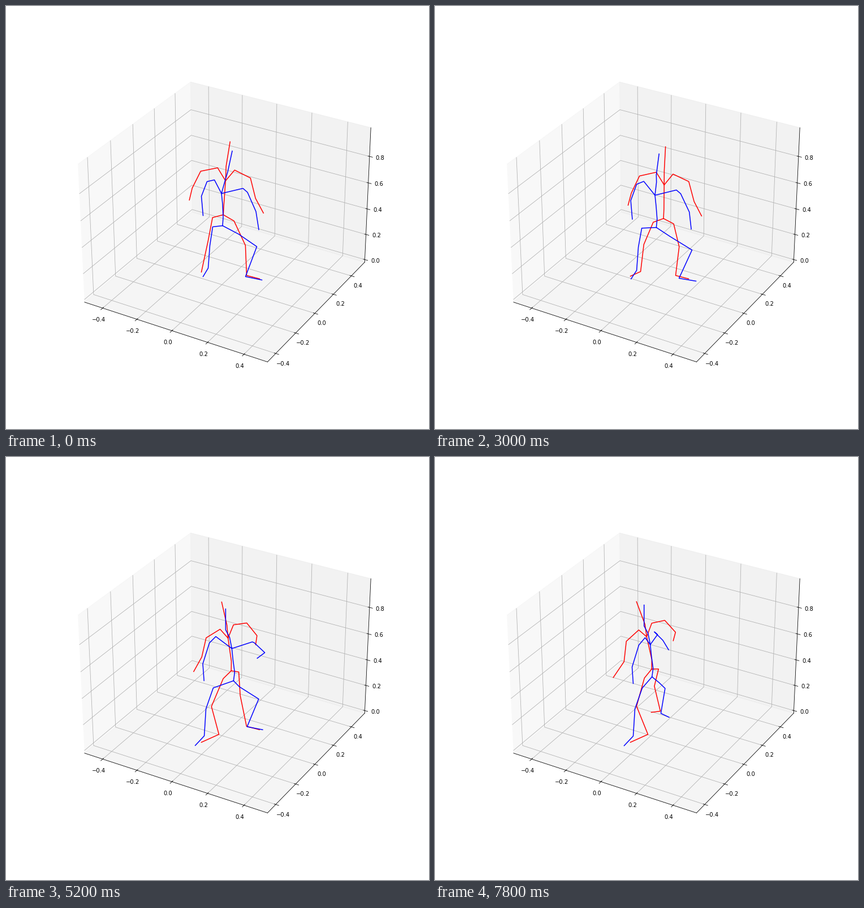
Animation, 748 px wide and 748 px high, one loop 8 s. Source, as a matplotlib script:

```python
import numpy as np
import matplotlib.pyplot as plt
from matplotlib.animation import FuncAnimation

SIZE, DPI = 748, 72
FRAMES, STEP = 40, 200

fig = plt.figure(figsize=((SIZE + 0.01) / DPI,) * 2, dpi=DPI, facecolor="white")

# Room: a cube seen from the default view, padded a little beyond the data
SIDE = 0.993
PAD = SIDE / 48
HALF = SIDE / 2 + PAD
room = fig.add_subplot(111, projection="3d")
room.set_xlim(0.0095 - HALF, 0.0095 + HALF)
room.set_ylim(0.0365 - HALF, 0.0365 + HALF)
room.set_zlim(-PAD, SIDE + PAD)
room.set_xticks(np.arange(-2, 3) / 5)
room.set_yticks(np.arange(-2, 3) / 5)
room.set_zticks(np.arange(5) / 5)

# Overlay in pixel coordinates for the two skeletons
stage = fig.add_axes([0, 0, 1, 1])
stage.set_xlim(-0.5, SIZE - 0.5)
stage.set_ylim(SIZE - 0.5, -0.5)
stage.axis("off")


def ease(t, start, end):
    s = min(max((t - start) / (end - start), 0), 1)
    return s * s * (3 - 2 * s)


def sway(t, peak, width):
    return np.exp(-((t - peak) / width) ** 2)


def blend(t, start, end, pose, goal):
    """Move a chain of points from one pose to another within a time window."""
    pose, goal = np.array(pose, float), np.array(goal, float)
    return pose + (goal - pose) * ease(t, start, end)


def lift(t, start, end, height):
    """Upward arc of a stepping foot."""
    return np.array([0, -height * np.sin(np.pi * ease(t, start, end))])


def leg(hip, bend, foot):
    """Hip, knee pushed out from the middle of the leg, ankle and toe."""
    knee = (hip + foot[0]) / 2 + bend
    return np.vstack([hip, knee, foot])


def red_figure(t):
    turn = ease(t, 1900, 6500)
    pelvis = (np.array([381.5, 368 + 6 * turn])
              + np.array([24, 7]) * sway(t, 3700, 2400))

    # mid back, chest, neck, head
    spine = pelvis + blend(t, 1200, 7200,
                           [(1, -17), (4, -60), (5, -86), (12, -129)],
                           [(0, -17), (-9, -57), (-12, -79), (-27, -119)])
    chest = spine[1]

    # collar, shoulder, elbow, wrist
    left_arm = chest + blend(t, 2400, 7000,
                             [(-14, -23), (-44, -17), (-59, 13), (-64, 34)],
                             [(-14, -12), (-36, 8), (-40, 44), (-59, 72)])
    right_arm = chest + blend(t, 2600, 5800,
                              [(16, -19), (44, -5), (53, 31), (67, 57)],
                              [(9, -24), (32, -29), (51, -8), (47, 7)])

    hips = pelvis + blend(t, 1900, 6500, [(-19, 5), (19, 11)],
                          [(-13, 16), (12, 0)])

    # the left foot steps first, the right foot is drawn in later
    first, second = (1500, 4200), (5100, 7500)
    left_foot = blend(t, *first, [(345, 470), (345, 470)],
                      [(376, 490), (345, 504)]) + lift(t, *first, 13)
    right_foot = blend(t, *second, [(425, 476), (448, 482)],
                       [(398, 449), (382, 451)]) + lift(t, *second, 6)
    left_bend = blend(t, 1800, 4600, (2, -7), (-17, 0))
    right_bend = blend(t, 2400, 6600, (9, -5), (-9, -7))

    return [np.vstack([pelvis, spine]),
            np.vstack([chest, left_arm]),
            np.vstack([chest, right_arm]),
            np.vstack([pelvis, leg(hips[0], left_bend, left_foot)]),
            np.vstack([pelvis, leg(hips[1], right_bend, right_foot)])]


def blue_figure(t):
    pelvis = (np.array([382.5, 388])
              + np.array([21.5, 8]) * sway(t, 4650, 1700))

    # lower back, mid back, chest
    back = pelvis + blend(t, 1800, 4600, [(1, -15), (0, -38), (-2, -57)],
                          [(2, -15), (-1, -37), (-3, -57)])
    chest = back[-1]
    # neck, skull base, head top
    head = chest + blend(t, 1800, 4600, [(7, -25), (11, -38), (19, -75)],
                         [(-4, -20), (-11, -33), (-11, -70)])

    # the left side stays in place while it sinks
    left_arm = blend(t, 1500, 6500,
                     [(368, 307), (355, 310), (345, 336), (348, 370)],
                     [(371, 319), (360, 332), (348, 371), (350, 400)])
    left_leg = blend(t, 2300, 5400,
                     [(365, 390), (360, 423), (357, 463), (348, 478)],
                     [(366, 408), (353, 445), (350, 493), (334, 510)])

    # the right hand comes up, then the shoulder folds in
    raised = [(36, -12), (39, -11), (58, 5), (43, 13)]
    tucked = [(12, -18), (6, -23), (21, -8), (32, 9)]
    right_arm = chest + blend(t, 2400, 5800,
                              [(38, -9), (46, -2), (61, 32), (66, 64)], raised)
    right_arm += (np.array(tucked) - raised) * ease(t, 6200, 8000)

    # the right knee spreads, then is drawn in
    spread = [(415, 407), (454, 431), (431, 481), (461, 486)]
    right_leg = blend(t, 0, 1500,
                      [(411, 403), (443, 425), (423, 478), (452, 484)], spread)
    right_leg += (np.array([(395, 398), (405, 408), (398, 452), (412, 459)])
                  - spread) * ease(t, 4200, 8200)

    return [np.vstack([pelvis, back, head]),
            np.vstack([chest, left_arm]),
            np.vstack([chest, right_arm]),
            np.vstack([pelvis, left_leg]),
            np.vstack([pelvis, right_leg])]


figures = [(pose, [stage.plot([], [], color=color, lw=1.5)[0] for _ in range(5)])
           for pose, color in ((red_figure, "red"), (blue_figure, "blue"))]


def update(i):
    for pose, lines in figures:
        for line, chain in zip(lines, pose(i * STEP)):
            line.set_data(*chain.T)
    return [line for _, lines in figures for line in lines]


anim = FuncAnimation(fig, update, frames=FRAMES, interval=STEP, repeat=True,
                     repeat_delay=0, blit=False)
plt.show()
```
